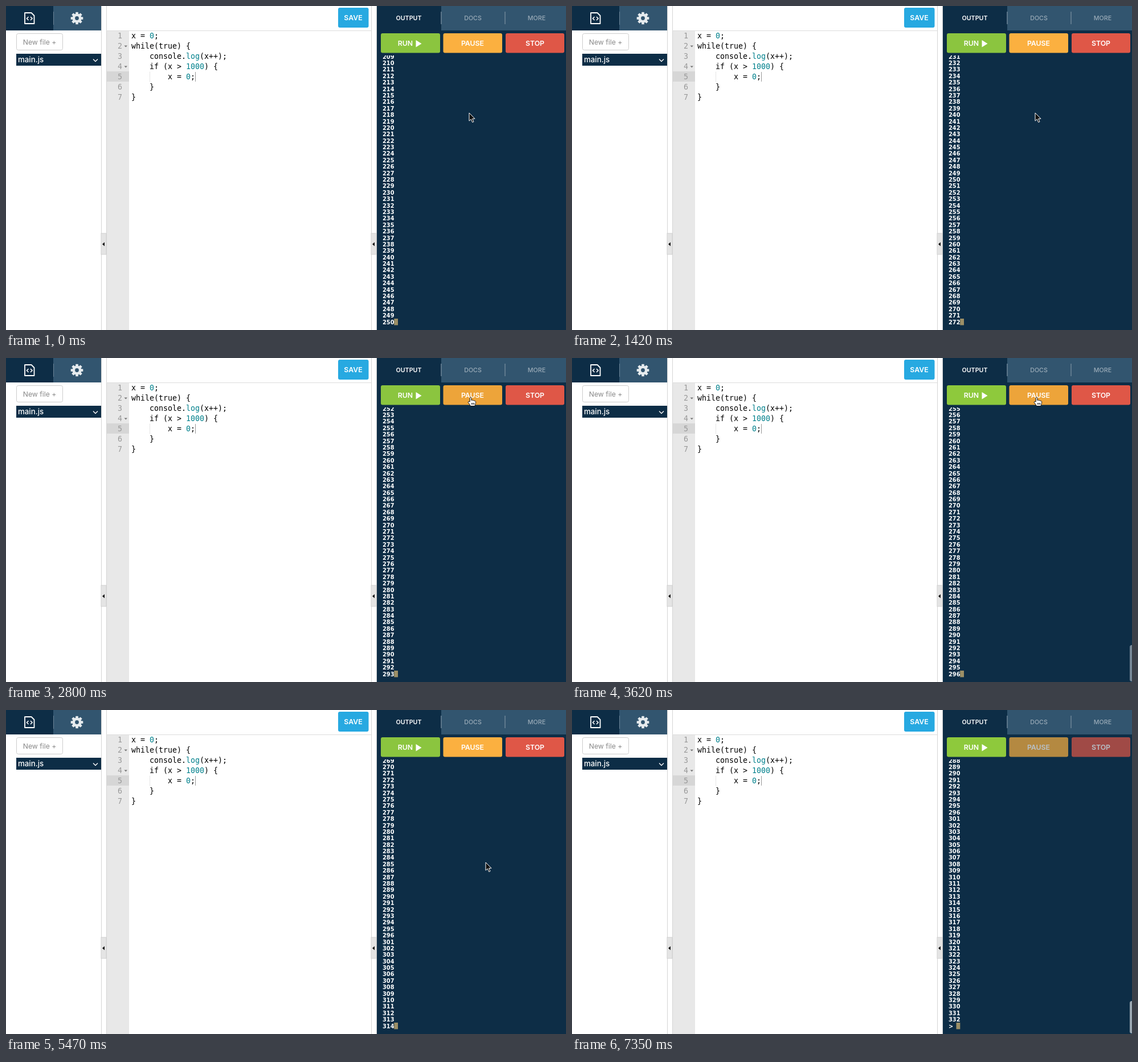
Write an HTML page that moves like this. It is 983x570 px and loops after 7950 ms.

```html
<!DOCTYPE html>
<html lang="en">
<head>
<meta charset="utf-8">
<title>Code editor</title>
<style>
  html, body { margin: 0; width: 100%; height: 100%; overflow: hidden; background: #fff; }
  svg { display: block; width: 983px; height: 570px; }
  text { font-family: Inter, "Open Sans", sans-serif; }
  .mid { text-anchor: middle; }
  .label { font-size: 12.3px; font-weight: 600; fill: #fff; text-anchor: middle; }
  .tab { font-size: 10.7px; font-weight: 500; fill: #9aabb8; text-anchor: middle; }
  #code text, #gutter text { font: 13.29px "DejaVu Sans Mono", monospace; }
  #code tspan { fill: #00808c; }
  #gutter text { fill: #999; text-anchor: end; }
  #log text { font: bold 9.8px "DejaVu Sans", sans-serif; fill: #fff; }
</style>
</head>
<body>
<svg viewBox="0 0 983 570">
  <defs>
    <clipPath id="below"><rect x="651" y="87" width="332" height="483"/></clipPath>
    <g id="handle">
      <path d="M.5 0V570M9.500 0V570" stroke="#d4d4d4"/>
      <rect y="400" width="9" height="37" fill="#e4e4e4" stroke="#d0d0d0"/>
      <path d="M6 415.500V422.500L2 419Z" fill="#111"/>
    </g>
    <rect id="tooth" x="-2.300" y="-10.800" width="4.600" height="5" rx=".6"/>
  </defs>

  <!-- file sidebar -->
  <rect width="83" height="43" fill="#0d2d46"/>
  <rect x="83" width="84" height="43" fill="#32556f"/>
  <path d="M83.500 10V33" stroke="#6d8598"/>
  <path d="M33 12H44.500L49.500 17V31H33Z" fill="none" stroke="#fff" stroke-width="1.800" stroke-linejoin="round"/>
  <path d="M39.500 19L36.500 22L39.500 25M43 19L46 22L43 25" fill="none" stroke="#fff" stroke-width="1.600"/>
  <g id="gear" transform="translate(124.500 21.500)" fill="#e6ebee">
    <circle r="5.700" fill="none" stroke="#e6ebee" stroke-width="4.600"/>
  </g>
  <rect x="18.500" y="48.500" width="81" height="29" rx="3" fill="#fff" stroke="#ccc"/>
  <text class="mid" x="59" y="68" font-size="12.200" fill="#888">New file +</text>
  <rect x="18" y="84" width="149" height="21" fill="#0d2d46"/>
  <text x="21" y="99" font-size="13.300" font-weight="500" fill="#fff">main.js</text>
  <path d="M153 93.500L157 97.500L161 93.500" fill="none" stroke="#fff" stroke-width="1.300"/>

  <!-- editor -->
  <use href="#handle" x="167"/>
  <rect x="177" y="43" width="39" height="527" fill="#e8e8e8"/>
  <rect x="177" y="115" width="39" height="18" fill="#d6d6d6"/>
  <path d="M176 43.500H641" stroke="#ddd"/>
  <rect x="583" y="3" width="53.500" height="35" rx="3" fill="#27a9e1"/>
  <text class="label" x="609.500" y="25">SAVE</text>
  <g id="gutter"></g>
  <path d="M207.500 69.500H213L210.250 72.500ZM207.500 105.500H213L210.250 108.500Z" fill="#777"/>
  <path d="M252.500 116V133" stroke="#ccc" stroke-dasharray="1 1"/>
  <g id="code">
    <text x="220" y="57">x = <tspan>0</tspan>;</text>
    <text x="220" y="75">while(true) {</text>
    <text x="252" y="93">console.<tspan>log</tspan>(x++);</text>
    <text x="252" y="111">if (x &gt; <tspan>1000</tspan>) {</text>
    <text x="284" y="129">x = <tspan>0</tspan>;</text>
    <text x="252" y="147">}</text>
    <text x="220" y="165">}</text>
  </g>
  <path d="M332.500 116V133" stroke="#999"/>
  <use href="#handle" x="641"/>

  <!-- output panel -->
  <rect x="651" width="332" height="570" fill="#0d2d46"/>
  <rect x="764" width="219" height="43" fill="#32556f"/>
  <path d="M764 10V32M876 10V32" stroke="#6d8598" stroke-width="1.500"/>
  <text class="tab" x="707" y="24.500" style="fill:#fff;font-weight:600">OUTPUT</text>
  <text class="tab" x="819.500" y="24.500">DOCS</text>
  <text class="tab" x="931.500" y="24.500">MORE</text>
  <g>
    <rect id="run" x="658" y="48" width="104" height="34.500" rx="3"/>
    <text class="label" x="701" y="69.500">RUN</text>
    <path d="M719.500 60V72.500L729.500 66.200Z" fill="#fff"/>
  </g>
  <g id="pause">
    <rect id="pauseBox" x="767.500" y="48" width="103.500" height="34.500" rx="3"/>
    <text class="label" x="819" y="70">PAUSE</text>
  </g>
  <g id="stop">
    <rect x="877" y="48" width="103" height="34.500" rx="3" fill="#df5747"/>
    <text class="label" x="928.500" y="70">STOP</text>
  </g>
  <g clip-path="url(#below)">
    <g id="log"></g>
    <rect id="caret" y="550" width="6.800" height="11.500" fill="#9c8f66"/>
  </g>
  <rect id="thumb" x="979" width="7" rx="3.500" fill="#9aa7b1"/>

  <path id="arrow" d="M0 0V14.200L3.300 11.200L5.700 16.600L8 15.600L5.700 10.300H10Z" fill="#111" stroke="#fff" stroke-linejoin="round"/>
  <path id="hand" d="M-1.800 8V1.500C-1.800-.4 .9-.4 .9 1.500V5.500C2 4.500 3.400 4.900 3.700 5.900C4.800 5.200 6 5.700 6.300 6.700C7.600 6.200 8.600 7 8.600 8.300C8.600 11.500 7.300 12.500 7 15.500H-.8C-1 13.300-3.400 11.500-4.700 9.300C-5.300 7.600-3.200 6.800-1.800 8ZM1.500 10V13M3.500 10V13M5.500 10V13" fill="#fff" stroke="#111" stroke-linejoin="round"/>
</svg>
<script>
const LOOP = 7950, ROWS = 42, PITCH = 11.39;
const STOPPED = 6800, PROMPT = 6860;
const $ = id => document.getElementById(id);

// [time, printed lines]; repeated values are short stalls and the long pause
const counts = [
  [0, 250], [119, 250], [120, 252], [269, 252], [270, 254], [840, 263],
  [1980, 281], [2099, 281], [2100, 283], [2800, 293], [3000, 296],
  [4430, 296], [4440, 297], [4510, 298], [5470, 310], [5589, 310],
  [5590, 312], [6680, 328]
];
// [time, x, y] of the pointer's hot spot
const route = [
  [0, 813, 188], [2250, 813, 188], [2620, 815, 74], [2680, 816, 69],
  [4750, 816, 69], [5100, 833, 160], [5470, 842, 268], [5590, 842, 268],
  [5930, 876, 225], [6450, 934, 61], [6680, 934, 72], [7080, 934, 72],
  [7350, 965, 575]
];

function make(tag, parent, attrs, text = "") {
  const node = document.createElementNS("http://www.w3.org/2000/svg", tag);
  for (const name in attrs) node.setAttribute(name, attrs[name]);
  node.textContent = text;
  return parent.appendChild(node);
}

function sample(keys, t, column = 1) {
  const next = keys.findIndex(key => key[0] > t);
  if (next < 0) return keys[keys.length - 1][column];
  const a = keys[next - 1], b = keys[next];
  return a[column] + (b[column] - a[column]) * (t - a[0]) / (b[0] - a[0]);
}

const clamp = v => Math.max(0, Math.min(1, v));
const show = (node, on) => node.setAttribute("visibility", on ? "visible" : "hidden");

for (let i = 0; i < 8; i++)
  make("use", $("gear"), { href: "#tooth", transform: `rotate(${i * 45})` });
for (let i = 0; i < 7; i++)
  make("text", $("gutter"), { x: 204, y: 57 + 18 * i }, i + 1);
const rows = Array.from({ length: ROWS }, (_, i) =>
  make("text", $("log"), { x: 661, y: 559.6 - PITCH * i }));

function drawLog(t) {
  const last = Math.floor(sample(counts, t) + 1e-6);
  const prompt = t >= PROMPT;
  rows.forEach((row, i) => {
    const n = last - i + (prompt ? 1 : 0);
    // four lines are lost while paused
    row.textContent = prompt && i === 0 ? ">" : n > 296 ? n + 4 : n;
  });
  $("caret").setAttribute("x", prompt ? 674.5 : 681.2);
}

function drawThumb(t) {
  const first = t >= 3060 && t < 3740;
  const top = first ? 505 : 512;
  $("thumb").setAttribute("y", top);
  $("thumb").setAttribute("height", 569 - top);
  $("thumb").setAttribute("opacity", first ? 1 - clamp((t - 3580) / 160) : 1);
  show($("thumb"), first || t >= PROMPT);
}

function drawPointer(t) {
  const x = sample(route, t), y = sample(route, t, 2);
  const overPause = y < 83 && x > 767 && x < 871;
  const hand = overPause || (y < 83 && x > 877);
  for (const id of ["arrow", "hand"])
    $(id).setAttribute("transform", `translate(${x} ${y})`);
  show($("arrow"), !hand && t < 7350);
  show($("hand"), hand);
  $("pauseBox").setAttribute("fill", overPause ? "#eda43a" : "#fbb040");
}

function draw(t) {
  drawLog(t);
  drawThumb(t);
  drawPointer(t);
  const idle = t >= STOPPED || (t >= 2950 && t < 4330);
  $("run").setAttribute("fill", idle ? "#8ec93c" : "#8bc53f");
  const opacity = 1 - 0.3 * clamp((t - STOPPED + 60) / 200);
  $("pause").setAttribute("opacity", opacity);
  $("stop").setAttribute("opacity", opacity);
}

const start = performance.now();
function tick() {
  draw((performance.now() - start) % LOOP);
  requestAnimationFrame(tick);
}
tick();
</script>
</body>
</html>
```
